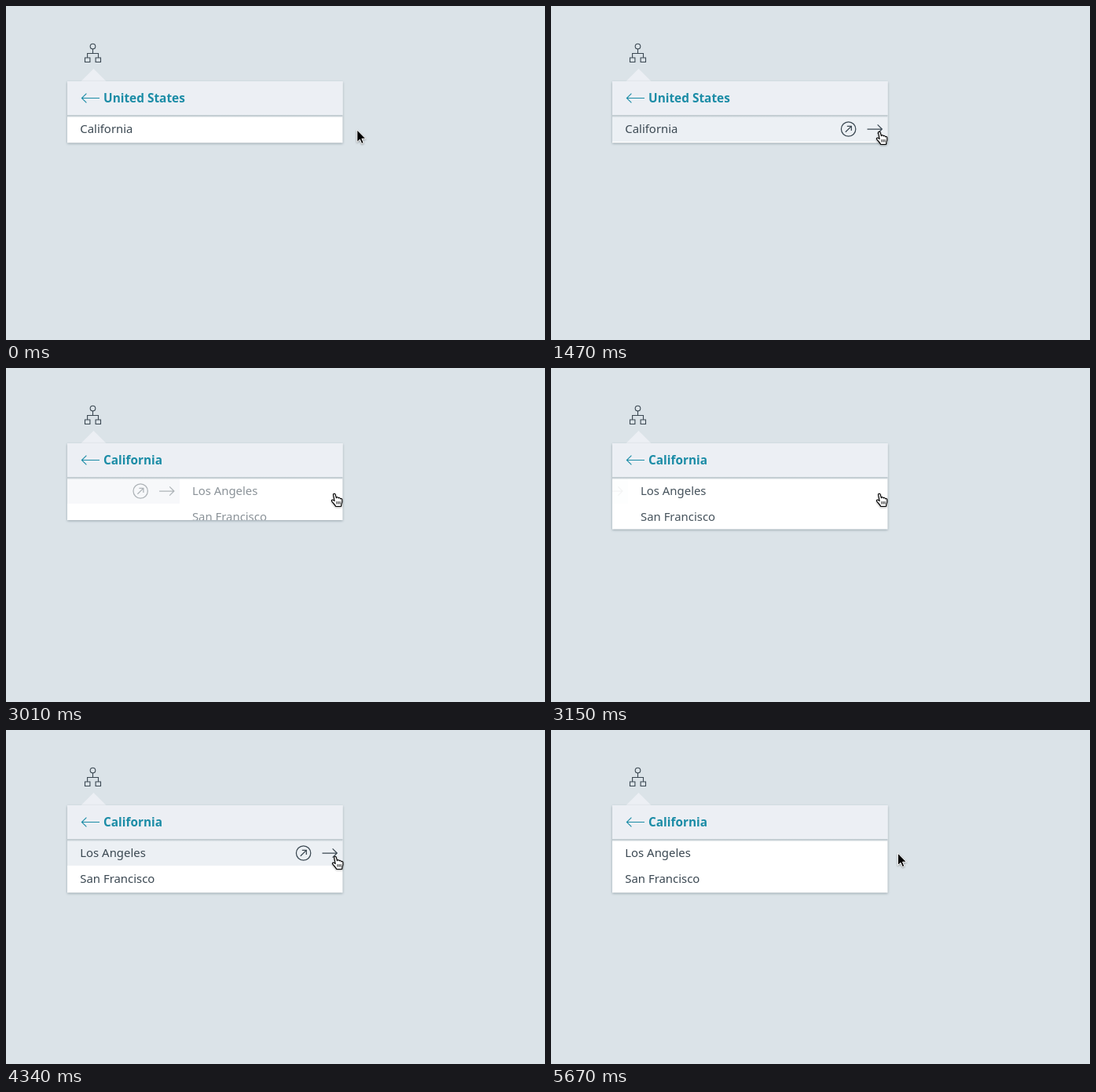
An HTML page for the animation above (5.95 s loop, 686 px wide and 426 px high).

```html
<!DOCTYPE html>
<html lang="en">
<head>
<meta charset="utf-8">
<title>Hierarchy menu</title>
<style>
  html, body { margin: 0; width: 100%; height: 100%; overflow: hidden; background: #dbe3e8; }
  svg { display: block; width: 100%; height: 100%; }
  text { font-family: "Noto Sans", "Open Sans", sans-serif; font-size: 14.9px; fill: #3b4852; }
  .title { font-size: 15.4px; font-weight: 700; fill: #1b8ca6; }
  .line { fill: none; stroke: #3b4852; stroke-width: 1.25; }
  #card { filter: drop-shadow(0 1.5px 1.5px rgba(50, 75, 85, .42)); }
  #cursor { filter: drop-shadow(0 1px 1px rgba(0, 0, 0, .35)); }
</style>
</head>
<body>
<svg viewBox="0 0 686 426">
  <defs>
    <clipPath id="clip"><rect id="window" x="78" y="140" width="350.5" height="34.5"/></clipPath>
    <linearGradient id="edge" x2="0" y2="1">
      <stop offset="0" stop-color="#bcc7cc"/>
      <stop offset=".45" stop-color="#c8d1d6"/>
      <stop offset="1" stop-color="#c8d1d6" stop-opacity="0"/>
    </linearGradient>
    <g id="actions" class="line">
      <circle cx="378.6" cy="157" r="9.2"/>
      <path d="M374.8 160.8 382.3 153.4M376.8 153.4H382.3V158.9"/>
      <path d="M402.5 157H421M415.6 151.4 421.3 157 415.6 162.6"/>
    </g>
  </defs>

  <rect width="686" height="426" fill="#dbe3e8"/>
  <g class="line" style="stroke-width:1.1">
    <circle cx="110.5" cy="51.6" r="3.3"/>
    <path d="M110.5 55V60.5M103.6 66V60.5H117.5V66M100.5 66h6.4v5.5h-6.4zM114.1 66h6.4v5.5h-6.4z"/>
  </g>

  <path d="M95 96.5 111.5 80 128 96.5z" fill="#eceff4"/>
  <rect id="card" x="78" y="96.3" width="350.5" height="78.2" fill="#fff"/>
  <g clip-path="url(#clip)">
    <g id="oldList">
      <rect id="oldRow" x="78" y="140" width="350.5" height="33" fill="#ecf0f4"/>
      <text x="94.3" y="162">California</text>
      <use id="oldActions" href="#actions"/>
    </g>
    <g id="newList">
      <rect id="newRow" x="78" y="140" width="350.5" height="33" fill="#ecf0f4"/>
      <text x="94.3" y="162">Los Angeles</text>
      <text x="94.3" y="195">San Francisco</text>
      <use id="newActions" href="#actions"/>
    </g>
  </g>
  <rect x="78" y="96" width="350.5" height="43.5" fill="#eceff4"/>
  <rect x="78" y="139" width="350.5" height="3.2" fill="url(#edge)"/>
  <path class="line" style="stroke:#1b8ca6;stroke-width:1.1" d="M96.5 117.5H119M102.4 111.6 96.4 117.5 102.4 123.4"/>
  <text id="title" class="title" x="124" y="123"></text>

  <circle id="ring" cx="419" cy="160" r="29" fill="none" stroke="#000" stroke-width="3"/>
  <g id="cursor">
    <path id="arrow" fill="#000" stroke="#fff" stroke-width="1"
      d="M0 0V15.6L3.6 12.3 5.9 17.6 8.4 16.5 6.1 11.3H11z"/>
    <g id="hand" fill="#fff" stroke="#000" stroke-width="1.15" stroke-linejoin="round">
      <path d="M-1.9 1.6C-2.2 .2 .1-.4 .6 1.2L1.9 5.8C2 4.3 4.2 4.3 4.5 6 5 5 6.7 5.2 7 6.9 7.6 6.2 9.2 6.4 9.3 8 9.6 10.5 9.4 12 8.3 14L8 16.5H1.2C.4 14.5-1.5 13-3.6 10.4-5 8.7-3.4 7.4-1.8 8.6L-.4 9.6z"/>
      <path fill="none" stroke-width=".9" d="M2.4 10.2V13.6M4.5 10.2V13.6M6.6 10.2V13.6"/>
    </g>
  </g>
</svg>
<script>
const LOOP = 5950, STEP = 70, WIDTH = 350;
const $ = id => document.getElementById(id);
const set = (id, name, value) => $(id).setAttribute(name, value);
const show = (id, on) => set(id, "visibility", on ? "visible" : "hidden");
const ramp = (t, a, b) => Math.min(1, Math.max(0, (t - a) / (b - a)));

// CSS "ease" curve, solved by bisection
function ease(x) {
  const curve = (s, a, b) => 3 * a * s * (1 - s) ** 2 + 3 * b * s * s * (1 - s) + s ** 3;
  let lo = 0, hi = 1;
  for (let i = 0; i < 24; i++) {
    const mid = (lo + hi) / 2;
    if (curve(mid, .25, .25) < x) lo = mid; else hi = mid;
  }
  return curve(lo, .1, 1);
}

// Pointer path: time, x, y
const path = [
  [0, 446.8, 158], [350, 446, 158], [490, 440, 158], [630, 432.5, 158],
  [770, 426, 158], [910, 423.3, 158], [1120, 423.3, 158], [1190, 421.5, 158.8],
  [1260, 420, 159.5], [1330, 420, 159.5], [1470, 418.5, 160], [4270, 418.5, 160],
  [4340, 419.6, 161], [4480, 423.5, 160.2], [4620, 428.5, 159.2], [4760, 433, 158.3],
  [4900, 436.2, 157.8], [5110, 440.5, 157.2], [5250, 441.4, 157], [LOOP, 441.4, 157]
];

function pointer(t) {
  const i = path.findIndex(k => k[0] > t);
  const [a, b] = [path[i - 1], path[i]];
  const f = ramp(t, a[0], b[0]);
  return [a[1] + (b[1] - a[1]) * f, a[2] + (b[2] - a[2]) * f];
}

function draw(t) {
  const slide = ease(ramp(t, 2878, 3263));
  const [x, y] = pointer(t);
  const isHand = t >= 1260 && t < 4480;
  const leave = 1 - ramp(t, 4600, 4880);

  set("card", "height", 78.2 + 33 * slide);
  set("window", "height", 34.5 + 33 * slide);
  set("oldList", "transform", `translate(${-WIDTH * slide})`);
  set("oldList", "opacity", 1 - slide);
  set("newList", "transform", `translate(${WIDTH * (1 - slide)})`);
  set("newList", "opacity", slide);

  set("oldRow", "opacity", ramp(t, 710, 1095));
  set("oldActions", "opacity", ramp(t, 700, 960));
  set("newRow", "opacity", ramp(t, 3200, 3480) * leave);
  set("newActions", "opacity", ramp(t, 3200, 3480) * leave);

  $("title").textContent = t < 2870 ? "United States" : "California";
  show("ring", t >= 2800 && t < 2940);
  show("arrow", !isHand);
  show("hand", isHand);
  set("cursor", "transform", `translate(${x} ${y})`);
}

const start = performance.now();
function tick() {
  const t = (performance.now() - start) % LOOP;
  draw(Math.floor(t / STEP) * STEP);
  requestAnimationFrame(tick);
}
tick();
</script>
</body>
</html>
```
